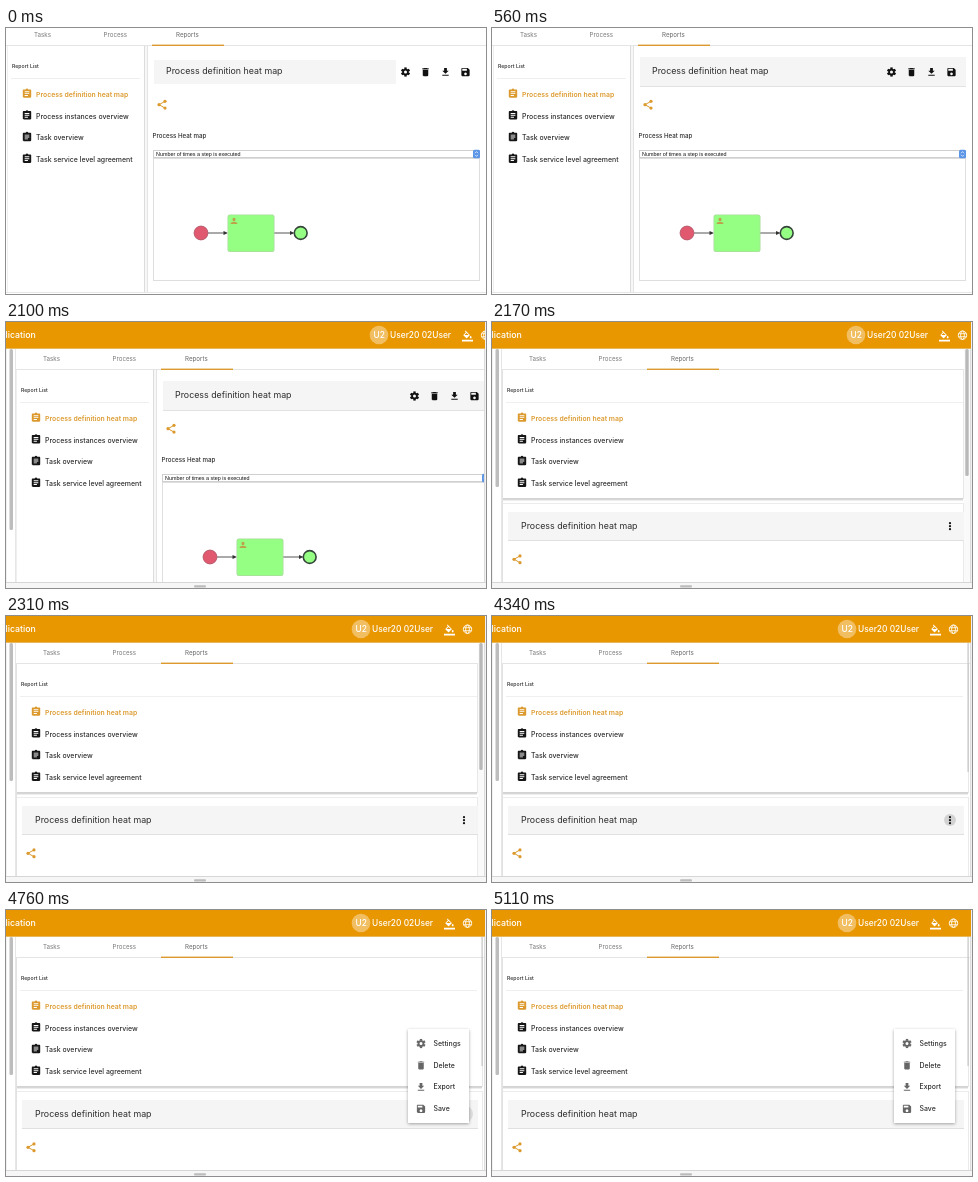
An HTML page with a canvas that plays this animation: 480 by 266 pixels, repeating every 8 s.

```html
<!DOCTYPE html>
<html lang="en">
<head>
<meta charset="utf-8">
<title>Report list</title>
<style>
html, body { margin: 0; width: 100%; height: 100%; overflow: hidden; background: #fff; }
canvas { display: block; width: 480px; height: 266px; }
</style>
</head>
<body>
<canvas id="stage"></canvas>
<script>
const W = 480, H = 266, LOOP = 8000;
const ORANGE = '#e89700', GOLD = '#dc9a2e', INK = '#2c2c2c';
const canvas = document.getElementById('stage');
const ratio = window.devicePixelRatio || 1;
canvas.width = W * ratio;
canvas.height = H * ratio;
const ctx = canvas.getContext('2d');

const REPORTS = ['Process definition heat map', 'Process instances overview',
  'Task overview', 'Task service level agreement'];

// Icon outlines on a 24 x 24 grid
const ICONS = {
  trash: 'M6 19c0 1.1.9 2 2 2h8c1.1 0 2-.9 2-2V7H6zM19 4h-3.5l-1-1h-5l-1 1H5v2h14z',
  download: 'M19 9h-4V3H9v6H5l7 7zM5 18v2h14v-2z',
  save: 'M17 3H5c-1.1 0-2 .9-2 2v14c0 1.1.9 2 2 2h14c1.1 0 2-.9 2-2V7zM12 19a3 3 0 1 1 .01 0zM15 9H5V5h10z',
  clipboard: 'M19 3h-4.2C14.4 1.8 13.3 1 12 1s-2.4.8-2.8 2H5c-1.1 0-2 .9-2 2v14c0 1.1.9 2 2 2h14c1.1 0 2-.9 2-2V5c0-1.1-.9-2-2-2zM7 7h10v2H7zM7 11h10v2H7zM7 15h7v2H7z',
  bucket: 'M16.6 9L7.6 0 6.2 1.4l2.4 2.4L3.4 9q-1 1 0 2l5.5 5.5q1 1 2.1 0l5.5-5.5q1-1 0-2zM5.2 10L10 5.2 14.8 10zM19 11.5s-2 2.2-2 3.5a2 2 0 0 0 4 0c0-1.3-2-3.5-2-3.5zM0 20h24v4H0z',
  person: 'M12 2a4.5 5.5 0 1 0 .01 0zM2 21v-2c0-3 5-4 10-4s10 1 10 4v2z'
};
const paths = Object.fromEntries(Object.entries(ICONS).map(([name, d]) => [name, new Path2D(d)]));

const clamp = v => Math.min(1, Math.max(0, v));
const progress = (t, from, to) => clamp((t - from) / (to - from));
const easeOut = p => 1 - (1 - p) ** 3;

function rect(x, y, w, h, color) {
  ctx.fillStyle = color;
  ctx.fillRect(x, y, w, h);
}

function roundRect(x, y, w, h, r, color) {
  ctx.beginPath();
  ctx.roundRect(x, y, w, h, r);
  ctx.fillStyle = color;
  ctx.fill();
}

function frame(x, y, w, h, color) {
  ctx.strokeStyle = color;
  ctx.lineWidth = 1;
  ctx.strokeRect(x + .5, y + .5, w - 1, h - 1);
}

function text(str, x, y, size, color = INK, weight = 400, family = 'Inter, sans-serif') {
  ctx.font = `${weight} ${size}px ${family}`;
  ctx.fillStyle = color;
  ctx.fillText(str, x, y);
}

function disc(x, y, r, fill, stroke, width = 1) {
  ctx.beginPath();
  ctx.arc(x, y, r, 0, Math.PI * 2);
  if (fill) { ctx.fillStyle = fill; ctx.fill(); }
  if (stroke) { ctx.strokeStyle = stroke; ctx.lineWidth = width; ctx.stroke(); }
}

function line(color, width, ...points) {
  ctx.beginPath();
  points.forEach(([x, y]) => ctx.lineTo(x, y));
  ctx.strokeStyle = color;
  ctx.lineWidth = width;
  ctx.stroke();
}

function icon(name, x, y, size, color) {
  ctx.save();
  ctx.translate(x - size / 2, y - size / 2);
  ctx.scale(size / 24, size / 24);
  ctx.fillStyle = color;
  ctx.fill(paths[name], 'evenodd');
  ctx.restore();
}

function gear(x, y, size, color) {
  ctx.save();
  ctx.translate(x, y);
  ctx.scale(size / 24, size / 24);
  disc(0, 0, 5.3, null, color, 4);
  for (let i = 0; i < 6; i++) {
    rect(-2.6, -10, 5.2, 4, color);
    ctx.rotate(Math.PI / 3);
  }
  ctx.restore();
}

function share(x, y) {
  line(GOLD, 1, [x + 3, y - 3.4], [x - 3, y], [x + 3, y + 3.4]);
  [[3, -3.4], [-3, 0], [3, 3.4]].forEach(([dx, dy]) => disc(x + dx, y + dy, 1.6, GOLD));
}

function globe(x, y) {
  disc(x, y, 4.2, null, '#fff', .9);
  ctx.beginPath();
  ctx.ellipse(x, y, 1.9, 4.2, 0, 0, Math.PI * 2);
  ctx.stroke();
  line('#fff', .8, [x - 4, y - 1.5], [x + 4, y - 1.5]);
  line('#fff', .8, [x - 4, y + 1.5], [x + 4, y + 1.5]);
}

function tabs() {
  const gray = '#777';
  text('Tasks', 28, 9, 6.2, gray);
  text('Process', 97.5, 9, 6.2, gray);
  text('Reports', 170, 9, 6.2, '#666');
  rect(0, 17, W, 1, '#e4e4e4');
  rect(146, 16.6, 72, 1.4, GOLD);
}

function reportList(dividerWidth) {
  text('Report List', 6, 40, 5.2, INK, 500);
  rect(5, 50, dividerWidth, 1, '#efefef');
  REPORTS.forEach((name, i) => {
    const y = 66 + i * 21.7, active = i === 0;
    icon('clipboard', 21, y - .4, 11.2, active ? GOLD : '#161616');
    text(name, 30, y + 2.9, active ? 6.85 : 6.95, active ? GOLD : INK, active ? 600 : 450);
  });
}

function arrow(x1, x2, y) {
  line('#555', 1, [x1, y], [x2 - 3, y]);
  ctx.beginPath();
  ctx.moveTo(x2, y);
  ctx.lineTo(x2 - 4.5, y - 2);
  ctx.lineTo(x2 - 4.5, y + 2);
  ctx.fillStyle = '#333';
  ctx.fill();
}

function heatMap() {
  frame(147, 130, 327, 123, '#dedede');
  arrow(202, 222, 205);
  arrow(268, 288.5, 205);
  disc(195, 205, 6.9, '#e0596f', '#b9596b', 1);
  roundRect(221.5, 186.5, 47, 37.5, 2.5, '#a9dc9c');
  roundRect(222.3, 187.3, 45.4, 35.9, 2, '#95ff83');
  icon('person', 228, 193, 8, '#bda24c');
  disc(294.7, 205, 6.4, '#95ff83', '#35453a', 1.6);
}

function chooser() {
  rect(147, 122, 327, 8, '#fff');
  frame(147, 122, 327, 8, '#cfcfcf');
  text('Number of times a step is executed', 150, 128, 5.4, '#111', 400,
    '"Liberation Sans", Arial, sans-serif');
  roundRect(467, 121.7, 7, 8.6, 1.5, '#5b95e6');
  line('#fff', .7, [469, 125.2], [470.5, 123.6], [472, 125.2]);
  line('#fff', .7, [469, 126.8], [470.5, 128.4], [472, 126.8]);
}

function widePage(settled) {
  tabs();
  rect(1, 18, 1, 246, '#efefef');
  rect(138, 18, 1, 247, '#dcdcdc');
  rect(139, 18, 2, 247, '#f7f7f7');
  rect(141, 18, 1, 247, '#e4e4e4');
  rect(0, 264, W, 1, '#e6e6e6');
  reportList(129);

  // The toolbar panel fills in downwards and to the right
  rect(148, 32 - 3 * settled, 242 + 84 * settled, 24 + 6 * settled, '#f5f5f5');
  ctx.globalAlpha = settled;
  rect(148, 58, 326, 1, '#e2e2e2');
  ctx.globalAlpha = 1;
  text(REPORTS[0], 160, 45.9, 8.85);
  gear(399.5, 44, 11, '#111');
  icon('trash', 419.5, 44, 11, '#111');
  icon('download', 439.5, 44, 11, '#111');
  icon('save', 459.5, 44, 11, '#111');
  share(156, 76.7);
  text('Process Heat map', 146.5, 109.8, 6.2, INK, 500);
  heatMap();
  chooser();
}

function appBar(shift) {
  rect(0, 0, 479, 26, ORANGE);
  rect(0, 26, 479, 1, '#e6b75c');
  text('lication', -.5, 16, 8.8, '#fff', 500);
  disc(355 + shift, 13, 9.3, '#f1bf62');
  text('U2', 349.5 + shift, 16, 8.4, '#fff', 500);
  text('User20 02User', 366 + shift, 16, 8.4, '#fff', 500);
  icon('bucket', 443.5 + shift, 14, 11, '#fff');
  globe(461.5 + shift, 13.2);
}

function windowEdge(thumbEnd) {
  rect(0, 27, 1, 234, '#f2f2f2');
  roundRect(3.5, 27, 3.5, thumbEnd - 27, 1.5, '#bdbdbd');
  rect(9, 27, 1, 234, '#e6e6e6');
  rect(479, 0, 1, H, '#f1f1f1');
  rect(478, 27, 1, 234, '#dcdcdc');
  rect(0, 261, W, 5, '#f6f6f6');
  rect(0, 260, W, 1, '#d6d6d6');
  roundRect(188, 263.2, 12, 2.3, 1, '#bcbcbc');
}

function moreButton(t) {
  if (t >= 4340) {
    const ripple = easeOut(progress(t, 4270, 4620));
    const fade = 1 - progress(t, 4620, 5110);
    disc(458, 204, 3 + 6 * ripple, `rgba(0,0,0,${.14 * fade})`);
  }
  [-3, 0, 3].forEach(dy => disc(458, 204.2 + dy, 1.1, '#111'));
}

function stackedPage(t) {
  const scrollbar = t < 4340;
  const right = scrollbar ? 471 : 476;
  ctx.save();
  ctx.translate(9, 30);
  tabs();
  reportList(457);
  ctx.restore();

  rect(10, 48, 1, 212, '#e2e2e2');
  rect(right, 48, 1, 129, '#e8e8e8');
  rect(11, 176.5, right - 11, 1, '#a8a8a8');
  rect(11, 177.5, right - 11, 1, '#dcdcdc');
  rect(11, 181, right - 11, 1, '#ececec');
  rect(right, 181, 1, 79, '#eaeaea');

  rect(16, 190, 456, 28.5, '#f5f5f5');
  rect(16, 218, 456, 1, '#e0e0e0');
  text(REPORTS[0], 29, 206.8, 8.85);
  moreButton(t);
  share(25, 237.3);

  if (scrollbar) {
    rect(472, 27, 6, 233, '#fafafa');
    roundRect(473.3, 27, 3.4, 127, 1.5, '#b8b8b8');
  } else {
    rect(475.5, 27, 1.2, 129, '#c4c4c4');
  }
}

function menu(t) {
  const scale = .5 + .5 * easeOut(progress(t, 4480, 4790));
  const bottom = 213;
  ctx.save();
  ctx.translate(0, bottom);
  ctx.scale(1, scale);
  ctx.translate(0, -bottom);
  ctx.globalAlpha = progress(t, 4410, 4550);
  ctx.shadowColor = 'rgba(0,0,0,.35)';
  ctx.shadowBlur = 3 * ratio;
  ctx.shadowOffsetY = ratio;
  rect(402, 119, 61, 94, '#fff');
  ctx.shadowColor = 'transparent';
  ctx.globalAlpha = progress(t, 4410, 4690);
  ['Settings', 'Delete', 'Export', 'Save'].forEach((label, i) => {
    const y = 133.5 + i * 21.8;
    text(label, 427.5, y + 2.2, 6.95, INK, 450);
    if (i === 0) gear(415, y, 11, '#666');
    else icon(['trash', 'download', 'save'][i - 1], 415, y, 11, '#666');
  });
  ctx.restore();
}

function draw(t) {
  ctx.setTransform(ratio, 0, 0, ratio, 0, 0);
  ctx.globalAlpha = 1;
  rect(0, 0, W, H, '#fff');
  if (t < 2100) {
    widePage(progress(t, 30, 280));
    return;
  }
  const resizing = t < 2170;
  if (resizing) {
    ctx.save();
    ctx.translate(9, 30);
    widePage(1);
    ctx.restore();
  } else {
    stackedPage(t);
  }
  appBar(resizing ? 18 : t < 2310 ? 9 : 0);
  windowEdge(resizing ? 208 : 165);
  if (t >= 4410) menu(t);
}

const start = performance.now();
function tick() {
  draw((performance.now() - start) % LOOP);
  requestAnimationFrame(tick);
}
tick();
</script>
</body>
</html>
```
